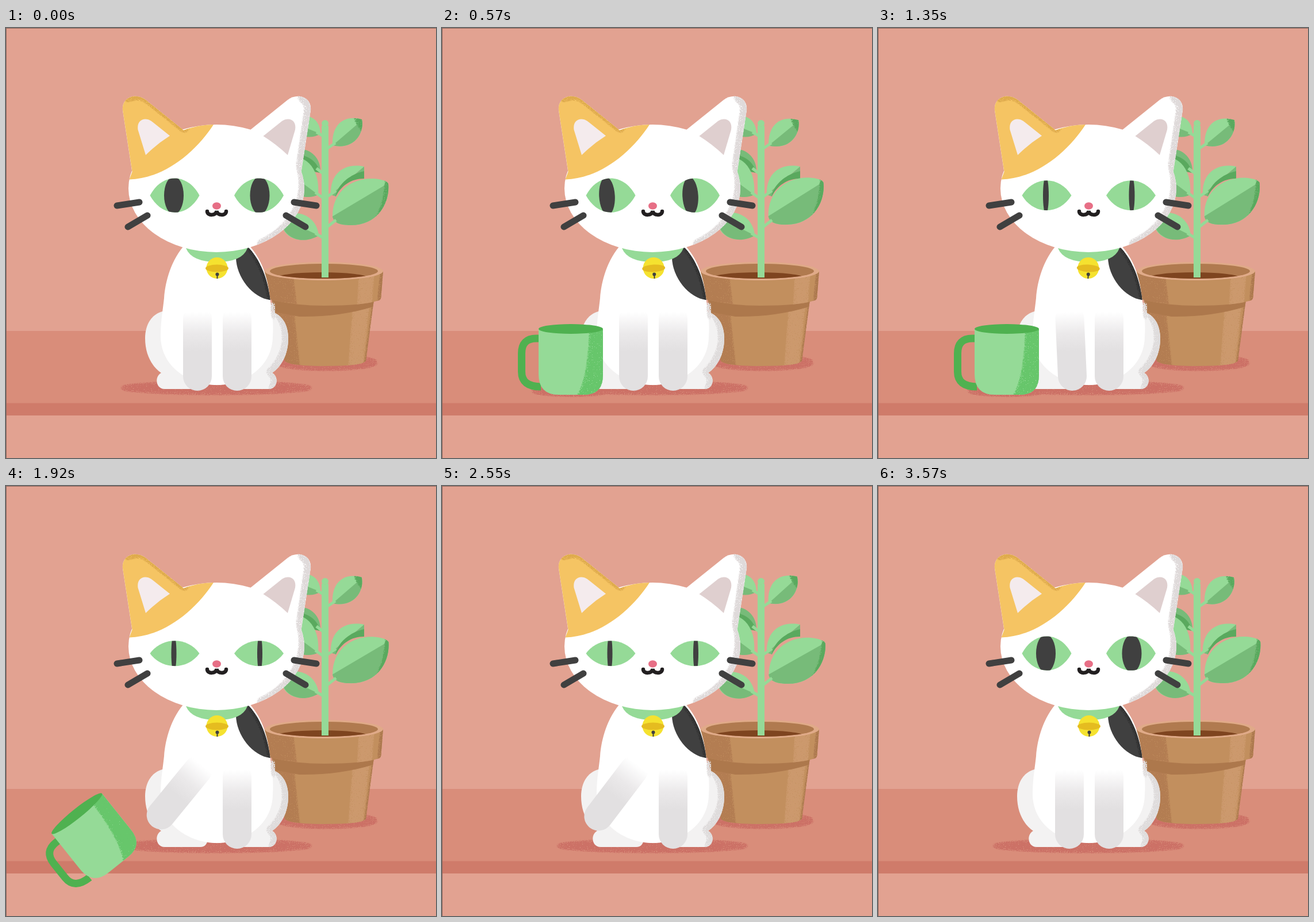
An HTML page for the animation above (3.6 s loop, 748x748 px).

```html
<!DOCTYPE html>
<html lang="en">
<head>
<meta charset="utf-8">
<title>Cat and mug</title>
<style>
  html, body { margin: 0; height: 100%; overflow: hidden; background: #e2a291; }
  svg { display: block; width: 100vw; height: 100vh; }
  .light { fill: #95da97; }
  .mid { fill: #77bb79; }
  .deep { fill: #5aa95e; }
  .ink { stroke: #404040; stroke-width: 11; stroke-linecap: round; }
</style>
</head>
<body>
<svg viewBox="0 0 748 748" fill="none">
  <defs>
    <!-- soft edge broken up into stipple -->
    <filter id="grain" x="-40%" y="-60%" width="180%" height="220%" color-interpolation-filters="sRGB">
      <feGaussianBlur in="SourceGraphic" stdDeviation="5" result="soft"/>
      <feTurbulence type="fractalNoise" baseFrequency=".75" numOctaves="2"/>
      <feColorMatrix values="0 0 0 0 0  0 0 0 0 0  0 0 0 0 0  3 0 0 0 -.5" result="noise"/>
      <feComposite in="soft" in2="noise" operator="in"/>
      <feComponentTransfer><feFuncA type="linear" slope="7" intercept="-1.9"/></feComponentTransfer>
    </filter>
    <linearGradient id="legFade" gradientUnits="userSpaceOnUse" x1="0" y1="494" x2="0" y2="562">
      <stop stop-color="#fff"/><stop offset=".55" stop-color="#ebe9ea"/><stop offset="1" stop-color="#e2e0e1"/>
    </linearGradient>
    <path id="earShape" d="M220 254L203 143C201 120 226 112 243 125L309 178L300 254Z"/>
    <path id="haunch" d="M300 494C262 484 242 508 242 540C242 568 254 589 270 600C258 606 260 628 276 628H338C354 628 356 603 338 599L330 520Z"/>
    <path id="orangeShape" d="M214.500 263.500L219.500 250L203 143C201 120 226 112 243 125L309 178Q335 168 361 168C330 216 275 262 214.500 263.500Z"/>
    <path id="patchShape" d="M419 379C443 402 456 440 459.500 473C430 470 400 434 400 398Z"/>
    <path id="potShape" d="M462 470L485 579Q492 588 555 588Q620 588 626 579L641 465Z"/>
    <path id="rimShape" d="M450 423L455 471Q500 483 553 483Q620 483 648 474Q652 473 652.500 468L656 423Z"/>
    <path id="mugShape" d="M168 524H280V604Q280 638 247 638H203Q168 638 168 602Z"/>
    <path id="topLeaf" d="M568 204C566 168 588 150 619 159C624 184 604 213 568 204Z"/>
    <path id="bigLeaf" d="M568 328C567 286 600 260 640 262Q662 264 665 271C668 302 648 343 600 343C581 343 570 339 568 328Z"/>
    <clipPath id="headClip"><ellipse cx="366" cy="279" rx="153" ry="111"/><use href="#earShape" transform="matrix(-1 0 0 1 733 0)"/></clipPath>
    <clipPath id="haunchClip"><use href="#haunch" transform="matrix(-1 0 0 1 733 0)"/></clipPath>
    <clipPath id="orangeClip"><use href="#orangeShape"/></clipPath>
    <clipPath id="patchClip"><use href="#patchShape"/></clipPath>
    <clipPath id="potClip"><use href="#potShape"/></clipPath>
    <clipPath id="rimClip"><use href="#rimShape"/></clipPath>
    <clipPath id="soilClip"><ellipse cx="553" cy="423" rx="94" ry="13"/></clipPath>
    <clipPath id="mugClip"><use href="#mugShape"/></clipPath>
    <clipPath id="topLeafClip"><use href="#topLeaf"/></clipPath>
    <clipPath id="bigLeafClip"><use href="#bigLeaf"/></clipPath>
  </defs>

  <path fill="#e2a291" d="M0 0H748V748H0Z"/>
  <path fill="#d98d7a" d="M0 527H748V653H0Z"/>
  <path fill="#cf7b6a" d="M0 652.500H748V674H0Z"/>

  <g fill="#cc7166" filter="url(#grain)">
    <ellipse cx="366" cy="626" rx="170" ry="11"/>
    <ellipse cx="558" cy="582" rx="90" ry="13"/>
  </g>
  <ellipse id="mugShadow" cx="225" cy="631" rx="72" ry="9" fill="#cc7166" filter="url(#grain)"/>

  <g id="pot">
    <use href="#potShape" fill="#c28f5e"/>
    <g clip-path="url(#potClip)">
      <path filter="url(#grain)" fill="#b37d52" d="M440 470H497L511 600H440Z"/>
      <path filter="url(#grain)" fill="#cc996d" d="M606 470H632L618 600H596Z"/>
      <path filter="url(#grain)" fill="#ad794f" d="M640 470H660V600H622Z"/>
      <path fill="#ad784c" d="M455 470H645L638 485Q580 503 510 502L468 494Z"/>
    </g>
    <use href="#rimShape" fill="#c28f5e"/>
    <g clip-path="url(#rimClip)">
      <path filter="url(#grain)" fill="#b37d52" d="M430 415H496L506 492H430Z"/>
      <path filter="url(#grain)" fill="#cc996d" d="M616 415H640L634 492H612Z"/>
      <path filter="url(#grain)" fill="#ad794f" d="M653 415H670V492H646Z"/>
    </g>
    <ellipse cx="553" cy="423" rx="103" ry="16" fill="#e0aa88"/>
    <ellipse cx="553" cy="423" rx="94" ry="13" fill="#b07a4f"/>
    <ellipse cx="550" cy="434" rx="78" ry="9" fill="#7e441f" clip-path="url(#soilClip)"/>
  </g>

  <g id="plant">
    <path class="light" d="M547 184C546 156 525 148 500 155C505 186 525 195 547 184Z"/>
    <path class="mid" d="M547 184L500 165C505 188 527 196 547 184Z"/>
    <path class="mid" d="M547 252C548 224 528 207 500 210L510 245Z"/>
    <path class="deep" d="M547 252C542 235 530 222 505 220L510 245Z"/>
    <path class="light" d="M543 290C546 250 528 224 495 222V285Q522 299 543 290Z"/>
    <path class="mid" d="M543 290L508 264L500 288Q526 299 543 290Z"/>
    <g id="lowLeaf">
      <path class="light" d="M544 361C541 334 520 320 496 322L481 345C485 366 515 377 544 361Z"/>
      <path class="mid" d="M544 361L492 336L481 345C488 367 517 377 544 361Z"/>
    </g>
    <path class="light" d="M565 290C563 252 590 234 623 241Z"/>
    <path class="mid" d="M565 290L623 241V256Q590 260 574 293Z"/>
    <path class="deep" d="M573 293C578 270 600 254 623 249V262C600 262 584 274 573 293Z"/>
    <g id="smallLeaf">
      <use href="#topLeaf" class="light"/>
      <g clip-path="url(#topLeafClip)">
        <path class="mid" d="M566 206L622 158V215H566Z"/>
        <path class="deep" filter="url(#grain)" d="M603 150H630V192L614 172Z"/>
      </g>
    </g>
    <g id="largeLeaf">
      <use href="#bigLeaf" class="light"/>
      <g clip-path="url(#bigLeafClip)">
        <path class="mid" d="M564 330L668 268V350H564Z"/>
        <path class="deep" filter="url(#grain)" d="M661 258H680V345H632Q659 320 661 258Z"/>
      </g>
    </g>
    <path stroke="#95da97" stroke-width="5" d="M555 212L573 200M555 296L574 283M555 349L574 334M555 190L540 181M555 256L540 244M555 298L538 286M555 367L538 357"/>
    <path stroke="#95da97" stroke-width="12" d="M555 434V170"/>
    <circle class="light" cx="555" cy="166" r="6"/>
  </g>

  <g id="cat">
    <use href="#haunch" fill="#f3f2f2"/>
    <use href="#haunch" fill="#f3f2f2" transform="matrix(-1 0 0 1 733 0)"/>
    <g clip-path="url(#haunchClip)">
      <path filter="url(#grain)" stroke="#dfdcdc" stroke-width="17" d="M462 484C494 500 504 560 464 598Q480 612 462 634"/>
    </g>
    <path fill="#fff" d="M312 376C288 402 277 440 275 470C272 497 269 512 269 536C269 590 320 621 367 621C414 621 464 590 464 536C466 512 462 490 459 468C455 432 445 402 421 376Z"/>
    <path filter="url(#grain)" stroke="#e2dfdf" stroke-width="7" d="M462 476Q467 495 466 508"/>
    <use href="#patchShape" fill="#404040"/>
    <g clip-path="url(#patchClip)"><path filter="url(#grain)" stroke="#333" stroke-width="14" d="M424 378Q456 415 464 476"/></g>
    <rect x="377" y="480" width="50" height="151" rx="25" fill="url(#legFade)"/>
    <rect id="leg" x="308" y="480" width="50" height="151" rx="25" fill="url(#legFade)"/>
    <path class="light" d="M313 370V383Q323 407 367 407Q411 407 420 383V370Z"/>
    <g id="bell">
      <circle cx="367" cy="417.500" r="18.500" fill="#f5e22f"/>
      <ellipse cx="367" cy="418" rx="20" ry="6.500" fill="#e5bc20"/>
      <circle cx="367.500" cy="428.500" r="3" fill="#404040"/>
      <path stroke="#404040" stroke-width="2" d="M367.500 428V436"/>
    </g>
    <use href="#earShape" fill="#fff"/>
    <use href="#earShape" fill="#fff" transform="matrix(-1 0 0 1 733 0)"/>
    <ellipse cx="366" cy="279" rx="153" ry="111" fill="#fff"/>
    <g clip-path="url(#headClip)">
      <path filter="url(#grain)" stroke="#dfdada" stroke-width="22" d="M510 116Q536 120 530 150L517 240Q528 275 514 311C500 344 474 368 440 382"/>
    </g>
    <use href="#orangeShape" fill="#f5c463"/>
    <g clip-path="url(#orangeClip)"><path filter="url(#grain)" stroke="#dfab4d" stroke-width="15" d="M206 124Q226 110 246 122L316 178"/></g>
    <path id="innerEar" fill="#f4ebed" d="M229.500 177C227 160 241 154 253 162L285 187.500Q262 202 243 221Z"/>
    <path fill="#dfcfcf" d="M503 177C506 160 492 154 480 162L447.500 188Q470 202 490 221Z"/>
    <path class="ink" d="M193 309L232 303M212 346L246 326M501 303L540 309M487 326L521 346"/>
    <path stroke="#221f20" stroke-width="6.500" stroke-linecap="round" d="M350 319C350 327 366 327 366.500 318C367 327 383 327 383 319"/>
    <ellipse cx="366.500" cy="309.500" rx="7.500" ry="6.200" fill="#e76f86"/>
    <g id="eyes"></g>
  </g>

  <g id="hold">
    <g class="arm" fill="#e3d1ad">
      <path d="M112 516Q128 500 148 500Q168 501 193 518L170 540Z"/>
      <path d="M99 552Q94 595 130 600L150 575Z"/>
      <path d="M144 560L172 570V618Q145 616 145 594Z"/>
    </g>
    <g id="mug">
      <path stroke="#4fb150" stroke-width="13" d="M172 540H164Q138.500 540 138.500 566V598Q138.500 624 172 624"/>
      <use href="#mugShape" class="light"/>
      <g clip-path="url(#mugClip)"><path filter="url(#grain)" fill="#67c66b" d="M258 515H300V650H228Q256 625 258 515Z"/></g>
      <ellipse cx="224" cy="523.500" rx="56" ry="8.500" fill="#4fb150"/>
    </g>
    <g class="arm" fill="#efdfbb">
      <path d="M-60 379L130 506L174 541Q188 550 185 563Q180 576 164 573L149 568Q140 584 121 585Q100 581 99 557L-60 456Z"/>
    </g>
  </g>
  <path stroke="#8f675d" d="M0 .5H748M.5 0V748"/>
</svg>
<script>
const LOOP = 3600;
const $ = id => document.getElementById(id);
const move = (el, value) => el.setAttribute('transform', value);
const arms = document.querySelectorAll('.arm');

// Eased value at time t from a flat list: time, value, time, value...
function track(t, ...keys) {
  if (t <= keys[0]) return keys[1];
  for (let i = 2; i < keys.length; i += 2) {
    if (t < keys[i]) {
      const p = (t - keys[i - 2]) / (keys[i] - keys[i - 2]);
      return keys[i - 1] + (keys[i + 1] - keys[i - 1]) * p * p * (3 - 2 * p);
    }
  }
  return keys[keys.length - 1];
}

const eyes = [[293.5, -1.5, -5], [440, 1.5, -9.5]].map(([x, rest, shift], i) => {
  $('eyes').insertAdjacentHTML('beforeend',
    `<g transform="translate(${x} 291.200)"><clipPath id="lid${i}"><path/></clipPath>
     <path class="light"/><g clip-path="url(#lid${i})"><ellipse ry="33" fill="#404040"/></g></g>`);
  const g = $('eyes').lastElementChild;
  return { lids: g.querySelectorAll('path'), pupil: g.querySelector('ellipse'), rest, shift };
});

function drawEyes(t) {
  const open = track(t, 1050, 29.6, 1300, 26, 1600, 26, 1900, 22, 2700, 22, 2840, 0, 2960, 0, 3180, 29.6);
  const width = track(t, 420, 17, 750, 9.5, 1050, 9.5, 1300, 5, 1600, 5, 1900, 4.5, 2850, 4.5, 2950, 17);
  const look = track(t, 60, 0, 280, 1, 1000, 1, 1250, 0);
  const c = open * 4 / 3;
  const d = `M-43 0C-22 ${-c} 22 ${-c} 43 0C22 ${c} -22 ${c} -43 0Z`;
  for (const { lids, pupil, rest, shift } of eyes) {
    lids.forEach(lid => lid.setAttribute('d', d));
    pupil.setAttribute('rx', width);
    move(pupil, `translate(${rest + shift * look} ${look}) rotate(${-3 * look})`);
  }
}

function drawMug(t) {
  const away = 1 - track(t, 0, 0, 270, 1);
  move($('hold'), `translate(${-340 * away} ${-130 * away})`);
  const leave = track(t, 340, 0, 620, 1);
  arms.forEach(arm => move(arm, `translate(${-260 * leave} ${-130 * leave})`));

  const fall = Math.max(0, t - 1760) / 400;
  const dx = track(t, 1640, 0, 1830, -62, 2180, -94);
  const turn = -86 * Math.pow(Math.max(0, t - 1640) / 520, 1.3);
  $('mug').style.display = t < 2260 ? '' : 'none';
  move($('mug'), `translate(${dx} ${214 * fall * fall}) rotate(${turn} 224 577)`);

  $('mugShadow').style.opacity = track(t, 120, 0, 270, 1, 1680, 1, 1840, 0);
  move($('mugShadow'), `translate(${-340 * away + dx} 0)`);
}

function drawLeg(t) {
  const angle = track(t, 1110, 0, 1350, -2.6, 1540, -3.5, 1800, 43, 2000, 37.3, 2730, 37.3, 3150, 0);
  const lift = track(t, 1540, 0, 1700, 11, 2900, 11, 3150, 0);
  move($('leg'), `rotate(${angle} 333 495) translate(0 ${-lift})`);
}

function draw(t) {
  const sway = Math.sin(t / LOOP * 2 * Math.PI) * 1.5;
  move($('largeLeaf'), `rotate(${-sway} 560 342)`);
  move($('smallLeaf'), `rotate(${sway} 562 208)`);
  move($('lowLeaf'), `rotate(${sway} 549 364)`);
  move($('bell'), `rotate(${track(t, 60, 0, 280, -3, 1000, -3, 1250, 3, 1500, 3, 1800, 0)} 367 395)`);
  drawEyes(t);
  drawLeg(t);
  drawMug(t);
}

const start = performance.now();
(function tick() {
  draw((performance.now() - start) % LOOP);
  requestAnimationFrame(tick);
})();
</script>
</body>
</html>
```
